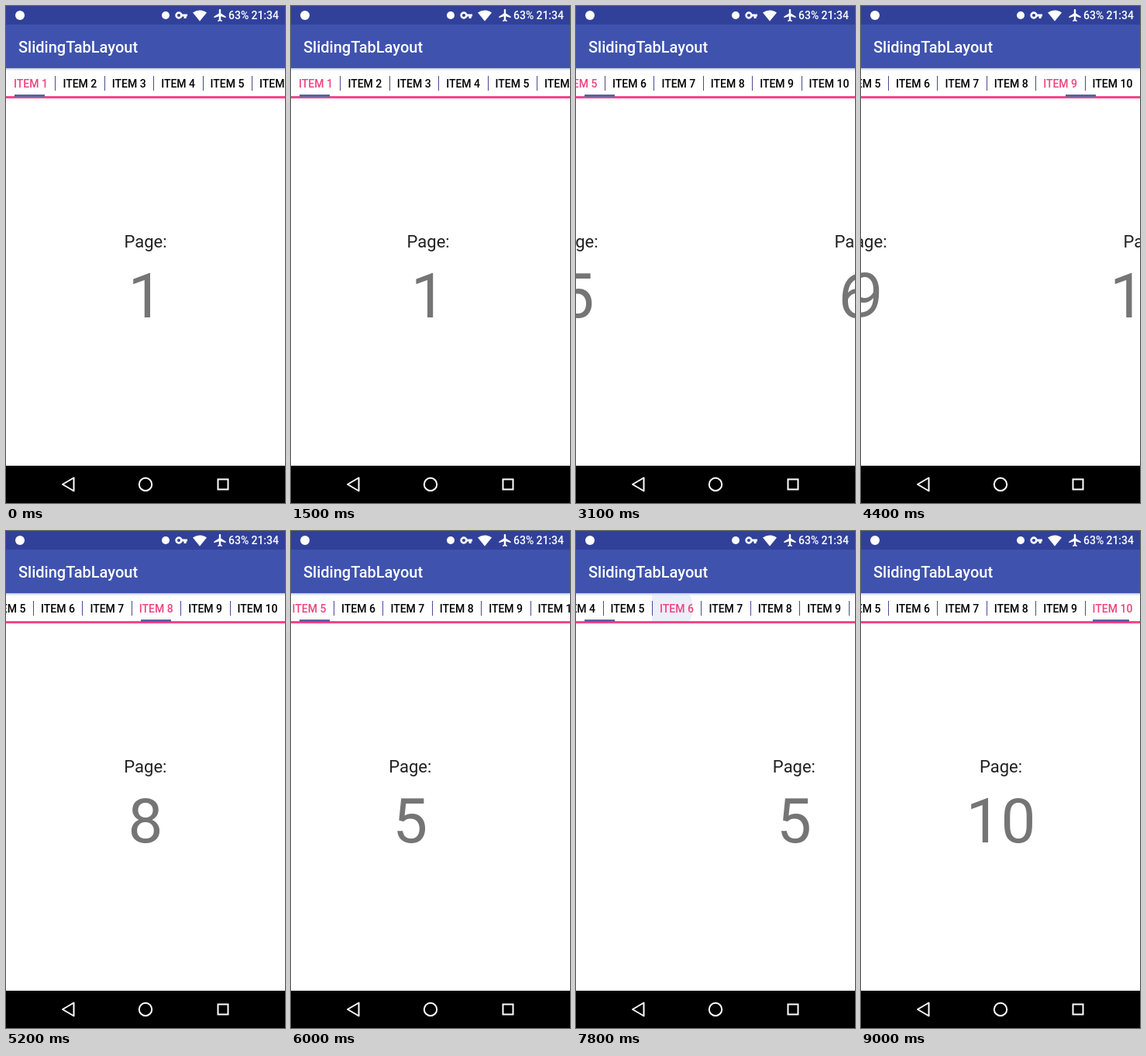
Animation, 360 px wide and 640 px high, one loop 9.2 s. Source, as an HTML page:

```html
<!DOCTYPE html>
<html lang="en">
<head>
<meta charset="utf-8">
<title>SlidingTabLayout</title>
<style>
  html, body { margin: 0; width: 100%; height: 100%; overflow: hidden; background: #fff; }
  svg { display: block; }
  text { font-family: Roboto, sans-serif; white-space: pre; }
  .tab { font-size: 14px; font-weight: 500; }
  .label { font-size: 22px; fill: #212121; text-anchor: middle; }
  .number { font-size: 80px; fill: #757575; text-anchor: middle; }
  .status { font-size: 14px; font-weight: 500; fill: #fff; }
  .title { font-size: 20px; font-weight: 500; fill: #fff; }
</style>
</head>
<body>
<svg id="stage" width="360" height="640" viewBox="0 0 360 640">
  <defs>
    <linearGradient id="shadow" x2="0" y2="1">
      <stop offset="0" stop-color="#7f8fc4" stop-opacity=".6"/>
      <stop offset="1" stop-color="#dfe6ff" stop-opacity="0"/>
    </linearGradient>
  </defs>
  <rect width="360" height="640" fill="#fff"/>
  <g id="pages"></g>

  <rect y="116" width="360" height="3" fill="#f5468a"/>
  <g id="tabs"></g>
  <rect id="indicator" y="114" height="3" fill="#5861a0"/>

  <rect y="80" width="360" height="4" fill="url(#shadow)"/>
  <rect y="24" width="360" height="56" fill="#3f53ae"/>
  <rect width="360" height="24" fill="#31419a"/>
  <text class="title" x="16" y="60">SlidingTabLayout</text>

  <!-- status icons -->
  <g fill="#fff">
    <circle cx="18" cy="12" r="6"/>
    <circle cx="206" cy="12" r="5"/>
    <circle cx="223" cy="12" r="3.4" fill="none" stroke="#fff" stroke-width="2.6"/>
    <path d="M226 10.6H234V13.4H232.6V16H229.6V13.4H226Z"/>
    <path d="M241 8.6Q250 2.4 259 8.6L250 19.5Z"/>
    <path transform="translate(266.8 2.4) scale(.8)" d="M21 16v-2l-8-5V3.5c0-.83-.67-1.5-1.5-1.5S10 2.67 10 3.5V9l-8 5v2l8-2.5V19l-2 1.5V22l3.5-1 3.5 1v-1.5L13 19v-5.5l8 2.5z"/>
  </g>
  <text class="status" x="287" y="17">63%</text>
  <text class="status" x="352" y="17" text-anchor="end">21:34</text>

  <!-- navigation bar -->
  <rect y="592" width="360" height="48"/>
  <g fill="none" stroke="#fff" stroke-width="2">
    <path d="M87.5 607.5V624.5L73 616Z" stroke-linejoin="round"/>
    <circle cx="180" cy="616" r="8.2"/>
    <rect x="273.5" y="609.5" width="13" height="13"/>
  </g>
</svg>
<script>
const LOOP = 9200, STEP = 100, COUNT = 10;
const TAB_WIDTH = 63.4, MAX_SCROLL = 282, PAGE_WIDTH = 360;
const SCROLL_LAG = 17;   // the tab strip follows the pager one display frame later

// swipe progress: [time, pages passed]
const swipes = [[1480, 0], [2100, 1.62], [3100, 4.498], [4300, 8.309],
                [4400, 8.489], [4640, 9], [6000, 4.165], [7430, 0]];
const taps = [
  { start: 7657, from: 0, to: 5, ripple: 7500 },
  { start: 8520, from: 5, to: 9, ripple: 8460 }
];

const $ = id => document.getElementById(id);
const clamp = (v, lo = 0, hi = 1) => Math.min(hi, Math.max(lo, v));
const smooth = u => u * u * (3 - 2 * u);
const settle = u => 1 - (1 - u) ** 5;

function add(parent, name, attrs, content = '') {
  const el = document.createElementNS('http://www.w3.org/2000/svg', name);
  for (const key in attrs) el.setAttribute(key, attrs[key]);
  el.textContent = content;
  return parent.appendChild(el);
}

for (const tap of taps) {
  const box = add($('tabs'), 'svg', { x: tap.to * TAB_WIDTH, y: 82, width: TAB_WIDTH, height: 34 });
  tap.circle = add(box, 'circle', { cx: 20, cy: 17, fill: '#ebeff8' });
}

const labels = [];
for (let i = 0; i < COUNT; i++) {
  const left = i * TAB_WIDTH, center = 180 + i * PAGE_WIDTH;
  labels.push(add($('tabs'), 'text', { class: 'tab', x: left + 10, y: 105 }, `ITEM ${i + 1}`));
  if (i) add($('tabs'), 'rect', { x: Math.round(left), y: 90, width: 1, height: 19, fill: '#464c8c' });
  add($('pages'), 'text', { class: 'label', x: center, y: 311 }, 'Page:');
  add($('pages'), 'text', { class: 'number', x: center, y: 401 }, i + 1);
}

function swipePosition(t) {
  let k = 1;
  while (k < swipes.length - 1 && t > swipes[k][0]) k++;
  const [t0, p0] = swipes[k - 1], [t1, p1] = swipes[k];
  const progress = p0 + (p1 - p0) * clamp((t - t0) / (t1 - t0));
  const page = Math.floor(progress);
  return page + smooth(progress - page);
}

const activeTap = t => taps.filter(tap => t >= tap.start).pop();

function position(t) {
  const tap = activeTap(t);
  if (!tap) return swipePosition(t);
  return tap.from + (tap.to - tap.from) * settle(clamp((t - tap.start) / 600));
}

function draw(t) {
  const page = position(t), tabPage = position(t - SCROLL_LAG);
  const scroll = Math.min(Math.round(tabPage * TAB_WIDTH), MAX_SCROLL);
  const tap = activeTap(t), selected = tap ? tap.to : Math.round(page);

  $('pages').setAttribute('transform', `translate(${-page * PAGE_WIDTH} 0)`);
  $('tabs').setAttribute('transform', `translate(${-scroll} 0)`);
  $('indicator').setAttribute('x', Math.round(11 + tabPage * TAB_WIDTH - scroll));
  $('indicator').setAttribute('width', 39 + 8 * clamp((tabPage - 8.5) * 2));
  labels.forEach((label, i) => label.setAttribute('fill', i === selected ? '#f0437f' : '#000'));

  for (const { circle, ripple, start } of taps) {
    circle.setAttribute('r', clamp(10 + (t - ripple) * 23 / 300, 0, 60));
    circle.setAttribute('opacity', t < ripple ? 0 : clamp((start + 480 - t) / 320));
  }
}

const began = performance.now();
function tick() {
  const t = (performance.now() - began) % LOOP;
  draw(Math.min(Math.floor(t / STEP) * STEP, LOOP - 2 * STEP));
  requestAnimationFrame(tick);
}
tick();
</script>
</body>
</html>
```
